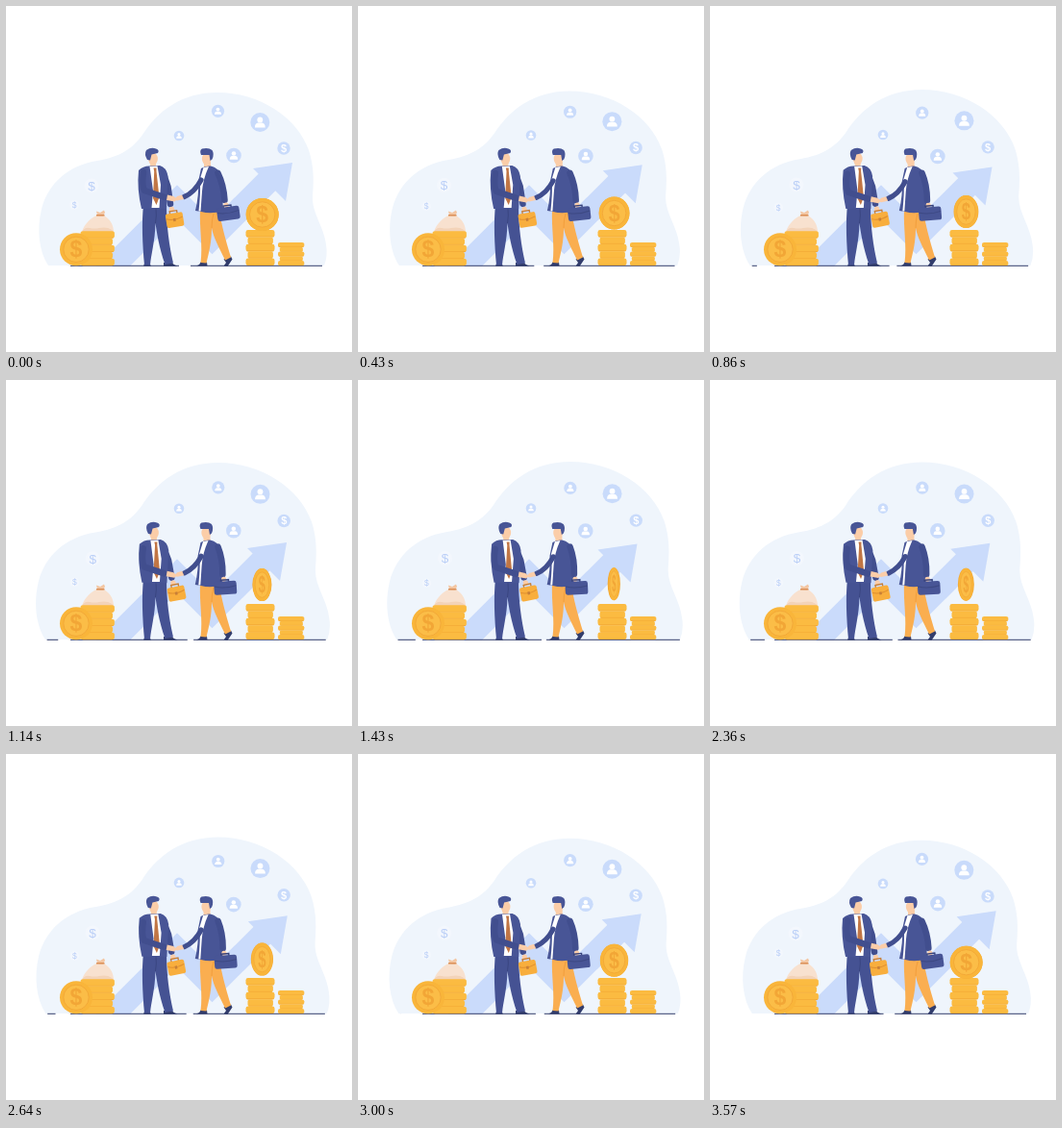
Animation of 360 by 360 pixels, one loop 3.64 s. Source, as an HTML page:

```html
<!DOCTYPE html>
<html lang="en">
<head>
<meta charset="utf-8">
<title>Business partnership</title>
<style>
/* --p runs 0 → 1 → 0; every moving part follows it by its own x, y, r or s. */
@property --p { syntax: "<number>"; inherits: true; initial-value: 0; }
@property --x { syntax: "<number>"; inherits: false; initial-value: 0; }
@property --y { syntax: "<number>"; inherits: false; initial-value: 0; }
@property --r { syntax: "<number>"; inherits: false; initial-value: 0; }
@property --s { syntax: "<number>"; inherits: false; initial-value: 0; }
@keyframes swing { to { --p: 1; } }
html, body { margin: 0; width: 100%; height: 100%; overflow: hidden; background: #fff; }
svg { display: block; width: 100vw; height: 100vh; animation: swing 1820ms linear infinite alternate; }
.m {
  transform: translate(calc(var(--p) * var(--x) * 1px), calc(var(--p) * var(--y) * 1px))
    rotate(calc(var(--p) * var(--r) * 1deg)) scale(calc(1 + var(--p) * var(--s)));
}
.spin { transform: scaleX(cos(var(--p) * 90deg)); }
.rim { vector-effect: non-scaling-stroke; }
.left-line { transform: translateX(calc(47px - var(--p) * 7px)) scaleX(max(0, (var(--p) - .35) * 42)); }
.mid-line { transform: translateX(67px) scaleX(calc(113 + var(--p) * 14)); }
.right-line { transform: translateX(calc(192px + var(--p) * 5px)) scaleX(calc(137 - var(--p) * 5 + var(--p) * var(--p) * 9.5)); }
text { font-family: "Liberation Sans", Arial, sans-serif; text-anchor: middle; }
.b { font-weight: bold; }
.sky { fill: #c9dbfb; }
.pale { fill: #b9cef7; }
.navy { fill: #485596; }
.dark { fill: #323d6c; }
.skin { fill: #fbcda8; }
.sleeve { fill: none; stroke: #414e8e; stroke-linecap: round; stroke-linejoin: round; }
</style>
</head>
<body>
<svg viewBox="0 0 360 360">
  <defs>
    <g id="person">
      <circle class="sky" r="10"/>
      <circle cy="-2.6" r="2.9" fill="#fff"/>
      <path d="M-5.4 5.4Q-5.4 1 -2 .6H2Q5.4 1 5.4 5.4Z" fill="#fff"/>
    </g>
    <g id="face">
      <circle r="17" fill="#f9b53a"/>
      <circle r="13.2" fill="#fbbd47" stroke="#f3a938"/>
      <text class="b" y="8" font-size="23" fill="#f2a636">$</text>
    </g>
    <g id="slab">
      <rect width="30" height="7.6" rx="2.4" fill="#fbbb41"/>
      <path d="M1 7H29" stroke="#f3aa36" stroke-width=".9"/>
    </g>
    <g id="stack">
      <use href="#slab"/>
      <use href="#slab" transform="translate(2 7.4) scale(.88 1)"/>
      <use href="#slab" y="14.8"/>
      <use href="#slab" transform="translate(2 22.2) scale(.88 1)"/>
      <use href="#slab" y="29.4"/>
    </g>
  </defs>

  <path class="m" style="--s:.035;transform-origin:184px 270px" fill="#eff5fc"
    d="M44 270C34 255 32 232 37 211C44 185 64 166 95 161C119 157 132 148 142 134C158 109 183 90 220 90C264 90 303 116 315 150C321 168 320 184 319 198C318 215 331 230 333 248Q335 260 331 270Z"/>

  <g fill="none" stroke="#cadbfb" stroke-width="25">
    <path d="M96 286L178 204L214.500 240.500L247 208"/>
    <path class="m" style="--x:-9.500;--y:9.500" d="M243 212L275 180"/>
  </g>
  <path class="m" style="--x:-9.500;--y:9.500" fill="#cadbfb" d="M298 163L257 169L291 203Z"/>
  <path d="M80 270.500H260V300H80Z" fill="#fff"/>

  <g class="m" style="--y:-2"><use href="#person" transform="translate(180 135) scale(.53)"/></g>
  <g class="m" style="--x:.5;--y:4"><use href="#person" transform="translate(220.5 109.3) scale(.66)"/></g>
  <g class="m" style="--x:.3;--y:-3.500"><use href="#person" transform="translate(264.3 121)"/></g>
  <g class="m" style="--x:-.3;--y:2"><use href="#person" transform="translate(237 155.5) scale(.78)"/></g>
  <g class="m" style="--x:.3;--y:-2.400">
    <circle class="sky" cx="289" cy="148" r="6.7"/>
    <text class="b" x="289" y="152" font-size="11" fill="#fff">$</text>
  </g>
  <g class="m" style="--x:2;--y:-2">
    <circle cx="89" cy="187" r="7.5" fill="#f3f7fd"/>
    <text class="pale" x="89" y="191.8" font-size="13.5">$</text>
  </g>
  <g class="m" style="--x:.5;--y:5.5">
    <circle cx="71" cy="207" r="4.8" fill="#f3f7fd"/>
    <text class="pale" x="71" y="210" font-size="8.5">$</text>
  </g>

  <g class="dark">
    <rect class="left-line" y="269.8" width="1" height="1"/>
    <rect class="mid-line" y="269.8" width="1" height="1"/>
    <rect class="right-line" y="269.8" width="1" height="1"/>
  </g>

  <path d="M79 235C81 227 88 221 94 218H102C109 222 112 229 112 235Z" fill="#f8e1cf"/>
  <path d="M79 235Q82 230 87 231T97 231T106 231T112 235Z" fill="#f3d3b8"/>
  <path d="M95 218L94 213.5L98 215L102 212.5L103 215L101 218.5Z" fill="#f3c6a2"/>
  <path d="M94 217.8H102.5" stroke="#d98a4f" stroke-width="1.4"/>

  <use href="#stack" transform="translate(77.5 234.3) scale(1.18 .97)"/>
  <use href="#face" x="73" y="253.3"/>
  <use href="#stack" x="249.5" y="233"/>
  <use href="#stack" transform="translate(283 246) scale(.91 .65)"/>

  <g class="m" style="--x:-.5;--y:-6.2">
    <g transform="translate(266.7 217)">
      <g class="spin">
        <circle class="rim" r="15.5" fill="#f3a934" stroke="#f3a934" stroke-width="3"/>
        <use href="#face"/>
      </g>
    </g>
  </g>

  <g id="right-man">
    <path class="dark" d="M198 270.6Q202 269 203 266L209 266.5L209.5 270.6ZM226.5 263.5L234 260.5L235.5 263.5L230.5 271L226.5 270.6L229 267Z"/>
    <path fill="#faae50" d="M202 212H222C224 228 229 245 234 261.5L228 264.5C221 250 216 241 214 231C214 246 211 257 208.5 267.5L202.5 267C205 250 201 230 202 212Z"/>
    <path d="M214 231Q214 222 216 216" fill="none" stroke="#ef9a38" stroke-width=".8"/>
    <g class="m" style="--r:-.5;transform-origin:210px 255px">
      <path class="skin" d="M206 160H213V169L206 170Z"/>
      <path class="navy" d="M203 169Q207 166 213 166.5Q221 168 224 177L226 213Q214 217 203 214L197 213Q201 196 200 183Z"/>
      <path fill="#fff" d="M205.5 168L211 167Q205 180 204 193L202.5 213.5H200.5Q203 190 201.5 181Z"/>
      <ellipse class="skin" cx="208.7" cy="159" rx="4.8" ry="6.5"/>
      <path class="navy" d="M203 155Q201 150 204 148.5Q211 147 214.5 150Q217 154 214.5 159.5L212.5 161L211.5 155Z"/>
    </g>
  </g>

  <g id="left-man">
    <path class="dark" d="M143 270.8L144 268H149.500L151 270.800ZM164 270.800V267L172 266.500Q174 269 178.500 270.800Z"/>
    <path fill="#455293" d="M143 207H167C167 230 170 250 174 267.500L165.500 269C159 251 157 236 155.500 226C155 245 151 258 150 269.500H144C142 248 141 225 143 207Z"/>
    <path d="M155.5 226Q157 217 156 211" fill="none" stroke="#37427b" stroke-width=".8"/>
    <g class="m" style="--r:-3.5;transform-origin:163px 172px">
      <path class="sleeve" stroke-width="6.5" d="M163 172L168.500 188L171 206"/>
      <circle class="skin" cx="172.5" cy="211.5" r="2.7"/>
      <g transform="rotate(-9 175 222)">
        <path d="M171.5 216V213.2H179V216" fill="none" stroke="#c77f38" stroke-width="1.4"/>
        <rect x="166.5" y="215.5" width="18" height="14.5" rx="2" fill="#f8ae3d"/>
        <path d="M167 220.5Q175 224 184 220.5" fill="none" stroke="#df8f30"/>
        <path d="M174 221H176.5V224H174Z" fill="#c77f38"/>
      </g>
    </g>
    <g class="m" style="--r:1;transform-origin:155px 250px">
      <path class="skin" d="M149 160H156V169L151 170Z"/>
      <path class="navy" d="M138 171Q143 166 150 166.5L160 166Q167 168 168.500 177L167 211H141Q136 190 138 171Z"/>
      <path fill="#fff" d="M149.5 167L157.5 166.5L161 186L159.500 210H151.500L153 192Z"/>
      <path fill="#c17645" d="M153.5 168.5H156.5V172L159.500 199L156.500 207L153 200L154.200 172Z"/>
      <ellipse class="skin" cx="153" cy="159" rx="4.9" ry="6.5"/>
      <path class="navy" d="M147 160Q143.5 154 146 150Q151 146.5 156 148.5Q160 149.5 158 153L151.5 154.5L150 160.5Z"/>
    </g>
  </g>

  <g class="m" style="--x:.3;--y:3.7">
    <path class="sleeve" stroke-width="5.2" d="M203 181Q196 194 185.5 198.5"/>
    <path class="skin" d="M183 196.5L185 201L178 202.5L174.5 201.5L178 198Z"/>
  </g>
  <g class="m" style="--x:-.5;--y:3.7">
    <path class="sleeve" stroke-width="6.5" d="M143 173Q141 186 144 192L165 199"/>
    <path class="skin" d="M168 196.5L174.5 198L178 201L175.5 203.5L167 202Z"/>
  </g>

  <g class="m" style="--r:7;transform-origin:224px 175px">
    <path class="sleeve" stroke-width="6.5" d="M220.5 174Q226.5 186 227.5 202"/>
    <circle class="skin" cx="229" cy="207" r="2.6"/>
    <g transform="rotate(-8 231 215)">
      <path d="M227 210V207.5H235V210" fill="none" stroke="#37427b" stroke-width="1.4"/>
      <rect x="219.5" y="209" width="23.5" height="13.800" rx="2.5" class="navy"/>
      <path d="M220 214Q231 217 242.500 214" fill="none" stroke="#3d4983"/>
    </g>
  </g>
</svg>
</body>
</html>
```
